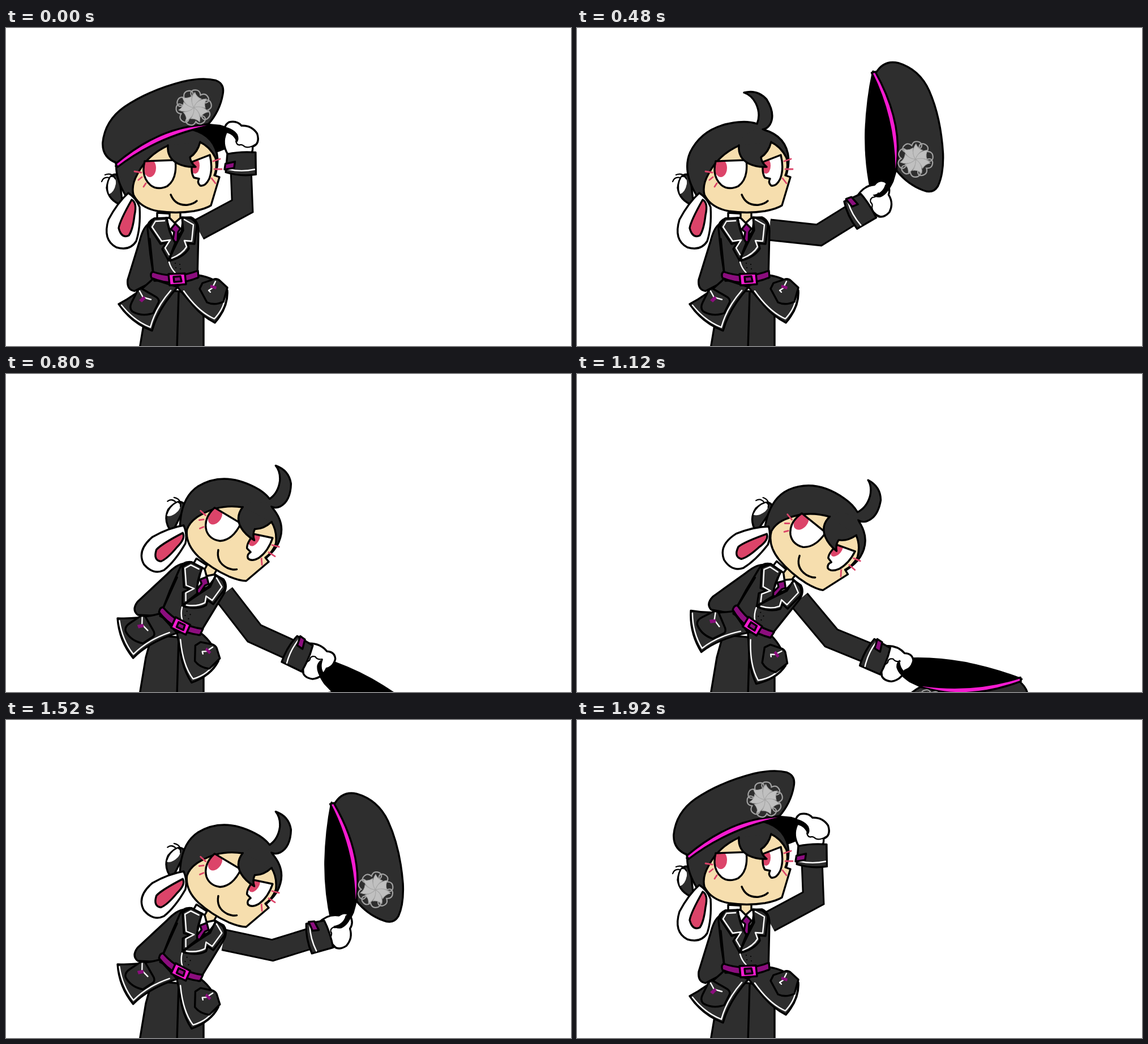
An HTML page for the animation above (2080 ms loop, 998 by 561 pixels).

```html
<!DOCTYPE html>
<html lang="en">
<head>
<meta charset="utf-8">
<title>Tip of the cap</title>
<style>
  html, body { margin: 0; width: 100%; height: 100%; overflow: hidden; background: #fff; }
  svg { display: block; width: 100%; height: 100%; }
  .ink { stroke: #000; stroke-width: 3.4; stroke-linejoin: round; stroke-linecap: round; fill: none; }
  .thin { stroke-width: 2.2; }
  .black { fill: #000; }
  .cloth { fill: #2e2e2e; }
  .white { fill: #fff; }
  .skin { fill: #f6deae; }
  .rose { fill: #dc4469; }
  .plum { fill: #8c0d7e; }
  .neon { fill: #f51bd0; }
  .trim { fill: none; stroke: #fff; stroke-width: 2.4; stroke-linejoin: round; stroke-linecap: round; }
  .lash { fill: none; stroke: #dc4469; stroke-width: 2.8; stroke-linecap: round; }
  .arm { fill: none; stroke-linejoin: miter; }
</style>
</head>
<body>
<svg viewBox="0 0 998 561" preserveAspectRatio="none">
  <defs>
    <path id="eyeShapeL" d="M245 235Q238 262 255 277Q268 287 285 279Q303 266 299 233Z"/>
    <path id="eyeShapeR" d="M329 236Q326 256 332 264L341 266Q337 273 343 278Q352 280 359 266Q366 248 360 224Z"/>
    <clipPath id="eyeL"><use href="#eyeShapeL"/></clipPath>
    <clipPath id="eyeR"><use href="#eyeShapeR"/></clipPath>
  </defs>

  <g class="cap">
    <path class="ink black" d="M193 243Q245 244 297 236Q352 227 401 206L408 190Q404 179 377 172L356 170Q258 176 193 243Z"/>
  </g>

  <polyline class="arm" stroke="#000" stroke-width="39"/>
  <polyline class="arm" stroke="#2e2e2e" stroke-width="33"/>

  <path class="ink cloth" d="M258 460L247 500L236 566H349V478L340 468Z"/>
  <path class="ink" d="M305 466L302 566"/>

  <g id="body">
    <!-- arm tucked behind the back -->
    <path class="ink cloth" d="M255 344Q243 348 236 376L215 444Q213 462 227 464L262 446Z"/>

    <!-- coat tails and pockets -->
    <path class="ink cloth" d="M302 456L338 436Q370 440 391 463Q393 492 369 520Q346 508 330 489Z"/>
    <path class="trim" d="M387 468Q388 492 368 513Q340 501 314 464"/>
    <path class="ink cloth" d="M347 450L368 443Q374 442 378 446L391 458L384 483Q368 490 355 484L342 460Z"/>
    <path class="trim" d="M358 463L364 459L370 447M358 463L361 466"/>
    <path class="plum" d="M361 453L372 456L371 461L361 458Z"/>
    <path class="ink cloth" d="M259 443Q232 470 199 487Q221 520 258 534Q268 496 303 457Z"/>
    <path class="trim" d="M204 489Q225 516 255 528Q264 494 291 463"/>
    <path class="ink cloth" d="M240 460L266 475Q272 480 269 485L260 503Q240 510 223 500Q217 494 222 484L232 464Q235 459 240 460Z"/>
    <path class="trim" d="M236 464L242 475L256 479"/>
    <path class="plum" d="M243 473L247 477L240 484L235 480Z"/>

    <path class="ink cloth" d="M262 336Q249 342 250 354L255 400L262 446L338 441L340 358Q340 340 327 334Z"/>
    <path class="ink" d="M254 372L260 432"/>

    <!-- neck, shirt and tie -->
    <path class="ink white" d="M267 326V340H300V328Z"/>
    <path class="ink white" d="M283 335L313 335L310 358L296 380Z"/>
    <path class="ink skin" d="M289 322V335L298 344L308 335V322Z"/>
    <path class="ink plum" d="M299 345L308 354L304 360L303 377L294 379L297 360L291 355Z"/>

    <!-- lapels -->
    <path class="ink cloth" d="M284 335L262 336Q254 346 253 351L273 381L284 378L276 390L287 410L299 379Q287 362 284 335Z"/>
    <path class="ink cloth" d="M311 334L327 336Q338 344 337 350L333 381L321 380L323 389Q313 405 287 411Q295 392 313 357Z"/>
    <path class="trim" d="M280 340L264 341L258 351L275 376L290 374L281 388L288 400M315 338L331 347L328 376L315 375L319 386Q311 399 293 406M288 413Q291 424 299 432"/>
    <path class="ink thin" d="M299 415h0M307 417h0M300 423h0M308 425h0"/>

    <path class="ink plum" d="M259 430Q254 433 257 441Q298 458 340 440L339 428Q300 444 259 430Z"/>
    <path class="ink neon" d="M287 434L316 433L318 452L289 454Z"/>
    <path class="ink plum" d="M296 439L308 438L310 447L297 448Z"/>

    <g id="head">
      <!-- far ear -->
      <path class="ink cloth" d="M200 260Q182 252 178 282Q181 305 206 313Z"/>
      <path class="white" d="M185 263Q195 262 194 275Q191 290 182 293Q177 276 185 263Z"/>
      <path class="ink thin" d="M169 271Q172 262 182 264M175 259Q187 254 193 266"/>

      <!-- hair with its loose curl -->
      <path class="ink cloth" d="M216 303Q184 255 200 219Q223 172 285 166Q303 164 318 169Q325 152 316 133Q308 118 295 114Q319 108 335 126Q351 152 341 170Q336 178 328 179Q371 190 374 232Q374 250 366 270L300 300Z"/>

      <!-- near ear -->
      <path class="ink white" d="M216 291Q197 308 181 338Q170 374 195 387Q219 394 230 376Q238 352 236 316Q230 300 216 291Z"/>
      <path class="ink rose" d="M222 303Q232 308 227 330Q224 356 217 366Q204 372 199 353Q201 340 222 303Z"/>

      <path class="ink skin" d="M287 207Q249 224 232 258Q221 277 225 294Q236 317 268 323Q300 328 332 323Q353 319 362 313L377 263L368 260Q374 246 370 229Q360 209 342 201Z"/>

      <g clip-path="url(#eyeL)">
        <path class="white" d="M236 228h70v60h-70z"/>
        <ellipse class="rose" cx="254" cy="247" rx="11" ry="16"/>
      </g>
      <use class="ink" href="#eyeShapeL"/>
      <g clip-path="url(#eyeR)">
        <path class="white" d="M324 220h44v62h-44z"/>
        <ellipse class="rose" cx="334" cy="243" rx="8" ry="14"/>
      </g>
      <use class="ink" href="#eyeShapeR"/>

      <path class="cloth" d="M286 208L294 190L320 176L350 192L342 203Z"/>
      <path class="ink cloth" d="M286 207Q284 229 303 239Q317 246 335 245Q326 238 325 228Q338 220 343 201"/>
      <path class="lash" d="M227 253L239 255M234 268L240 263M243 280L247 274M366 235L378 231M368 249L381 249M363 265L370 274"/>
      <path class="ink" d="M291 294Q299 314 321 312Q332 310 337 305"/>
    </g>
  </g>

  <g class="cap">
    <path class="ink cloth" d="M196 238Q169 229 170 202Q174 163 208 139Q250 110 312 94Q347 86 370 92Q386 98 382 117Q377 146 356 170Q280 176 196 238Z"/>
    <path class="ink neon" d="M193 239Q262 181 332 172L357 169L354 173Q265 192 196 245Z"/>
    <g id="badge" transform="translate(331 140)"></g>
  </g>

  <g id="glove">
    <path class="ink white" d="M390 222Q379 202 388 184Q383 171 394 165Q408 162 416 172Q434 172 443 187Q448 205 434 210Q435 218 430 222Q410 228 390 222Z"/>
    <path class="ink thin" d="M404 186Q409 193 405 199Q406 206 412 206M439 206Q428 213 420 209Q415 204 411 206"/>
  </g>
  <g class="cap">
    <path class="black" d="M374 172Q399 174 408 187Q412 196 407 202Q401 185 385 184Z"/>
  </g>

  <g id="cuff">
    <path class="ink cloth" d="M389 221Q412 217 439 220L438 259Q410 262 385 253Z"/>
    <path class="trim" d="M390 248Q412 254 436 250"/>
    <path class="ink plum" d="M385 238L402 235L400 246L383 248Z"/>
  </g>
</svg>

<script>
const STEP = 80, STEPS = 26;
const PIVOT = [303, 445], NECK = [298, 330], SHOULDER = [340, 356], PALM = [412, 192], CUFF = [412, 241];
const UPPER_ARM = 88, FOREARM = 122;

// Degrees: lean of the body, direction of the arm (0 is up), turn of the cap.
const REST   = { lean: 0,   swing: 24,  turn: 0 };
const WINDUP = { lean: -14, swing: 27,  turn: 8 };
const OFFER  = { lean: 0,   swing: 74,  turn: 101 };
const BOW    = { lean: 30,  swing: 126, turn: 221 };
const DIP    = { lean: 43,  swing: 122, turn: 183 };
const RAISE  = { lean: 30,  swing: 85,  turn: 100 };
const SETTLE = { lean: -11, swing: 26,  turn: 6 };

const TIMELINE = [
  [0, REST], [3, WINDUP], [6, OFFER], [10, BOW], [13, BOW],
  [16, DIP], [19, RAISE], [22, SETTLE], [24, REST], [STEPS, REST]
];

const $ = selector => document.querySelector(selector);
const $$ = selector => document.querySelectorAll(selector);
const setTransform = (part, value) => part.setAttribute('transform', value);
const radians = degrees => degrees * Math.PI / 180;
const easeOut = k => 1 - (1 - k) ** 2;

// Moves the point `from` to `to` and turns the part around it.
const place = (to, degrees, from) =>
  `translate(${to}) rotate(${degrees}) translate(${-from[0]} ${-from[1]})`;

// The point at a distance from another, in a direction clockwise from up.
const polar = ([x, y], degrees, length) =>
  [x + length * Math.sin(radians(degrees)), y - length * Math.cos(radians(degrees))];

function poseAt(tick) {
  const next = TIMELINE.findIndex(([at]) => at > tick);
  const [start, a] = TIMELINE[next - 1], [end, b] = TIMELINE[next];
  const k = easeOut((tick - start) / (end - start));
  const mix = key => a[key] + (b[key] - a[key]) * k;
  return { lean: mix('lean'), swing: mix('swing'), turn: mix('turn') };
}

function solveArm(shoulder, swing) {
  const reach = Math.min(204, 179 + (swing - REST.swing) * 0.4);
  const bend = Math.acos((UPPER_ARM ** 2 + reach ** 2 - FOREARM ** 2) / (2 * UPPER_ARM * reach));
  const hand = polar(shoulder, swing, reach);
  const elbow = polar(shoulder, swing + bend * 180 / Math.PI, UPPER_ARM);
  const aim = Math.atan2(hand[0] - elbow[0], elbow[1] - hand[1]) * 180 / Math.PI;
  const cuff = polar(hand, aim, (reach - 179) * 0.4 - 49);
  return { hand, elbow, aim, cuff };
}

function draw(tick) {
  const { lean, swing, turn } = poseAt(tick);
  const bow = Math.max(0, lean);
  const hips = [PIVOT[0] + bow * 0.17, PIVOT[1] + bow * 0.05];
  const dx = SHOULDER[0] - PIVOT[0], dy = PIVOT[1] - SHOULDER[1];
  const shoulder = polar(hips, lean + Math.atan2(dx, dy) * 180 / Math.PI, Math.hypot(dx, dy));
  const { hand, elbow, aim, cuff } = solveArm(shoulder, swing);

  setTransform($('#body'), place(hips, lean, PIVOT));
  setTransform($('#head'), `rotate(${lean * 0.1} ${NECK})`);
  setTransform($('#glove'), place(hand, aim, PALM));
  setTransform($('#cuff'), place(cuff, aim, CUFF));
  $$('.cap').forEach(part => setTransform(part, place(hand, turn, PALM)));

  const wrist = polar(cuff, aim, -8);
  $$('.arm').forEach(line => line.setAttribute('points', [shoulder, elbow, wrist].join(' ')));
}

function buildBadge() {
  const ring = (count, offset, shape) => Array.from({ length: count },
    (_, i) => `<g transform="rotate(${i * 360 / count + offset})">${shape}</g>`).join('');
  $('#badge').innerHTML =
    ring(5, 28, '<path fill="none" stroke="#a0a0a0" stroke-width="2.2" d="M-8 -14Q-22 -19 -15 -27Q-6 -34 0 -25Q6 -34 15 -27Q22 -19 8 -14"/>') +
    ring(7, 8, '<path fill="#c0c0c0" stroke="#a6a6a6" d="M0 0Q-10 -12 -2 -27Q2 -19 11 -17Q3 -11 0 0Z"/>');
}

function frame() {
  draw(Math.floor(performance.now() / STEP) % STEPS);
  requestAnimationFrame(frame);
}

buildBadge();
frame();
</script>
</body>
</html>
```
